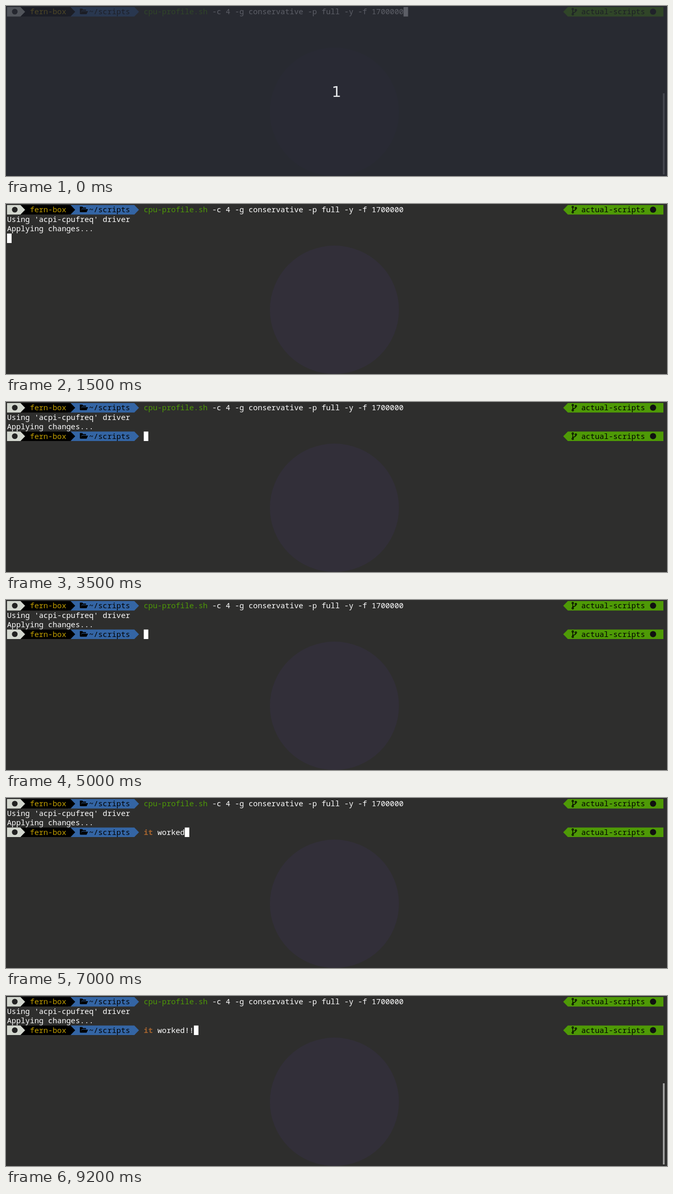
These frames come from a looping animation (1280x331 px, 9.3 s). An HTML page with a canvas:

```html
<!DOCTYPE html>
<html>
<head>
<meta charset="utf-8">
<style>
html, body { margin: 0; height: 100%; overflow: hidden; background: #2e2e2d; }
canvas { display: block; }
</style>
</head>
<body>
<canvas id="stage" width="1280" height="331"></canvas>
<script>
const ctx = document.getElementById('stage').getContext('2d');
const LOOP = 9300, CELL = 8.825, ROW = 18.5, LEFT = 2, TOP = 2;
const col = n => LEFT + n * CELL;
const rowTop = n => TOP + n * ROW;

// Cursor as [start, column, row]; row -1 hides it.
const cursorSteps = [
  [0, 87, 0], [900, 0, -1], [1000, 0, 1], [1500, 0, 3], [2000, 0, -1],
  [2200, 0, 3], [2800, 0, -1], [3500, 30, 3], [4000, 30, -1], [5000, 30, 3],
  [5200, 31, 3], [5300, 32, 3], [5500, 33, 3], [5700, 34, 3], [5900, 35, 3],
  [6200, 36, 3], [6400, 37, 3], [6500, 38, 3], [7000, 39, 3], [7900, 40, 3],
  [8000, 41, 3], [8600, 41, -1], [8800, 41, 3]
];
const typed = 'it worked!!';

function rect(x, y, w, h, color) {
  ctx.fillStyle = color;
  ctx.fillRect(x, y, w, h);
}

function dot(x, y, r, color) {
  ctx.fillStyle = color;
  ctx.beginPath();
  ctx.arc(x, y, r, 0, Math.PI * 2);
  ctx.fill();
}

function poly(color, ...points) {
  ctx.fillStyle = color;
  ctx.beginPath();
  points.forEach(([x, y]) => ctx.lineTo(x, y));
  ctx.fill();
}

function write(text, column, row, color, weight = 400) {
  ctx.font = weight + ' 14.7px "Noto Sans Mono", monospace';
  ctx.textAlign = 'left';
  ctx.textBaseline = 'alphabetic';
  ctx.fillStyle = color;
  [...text].forEach((ch, i) => ctx.fillText(ch, col(column + i), rowTop(row) + 14));
}

// Flat bar from x to the tip, pointing right or left.
function arrow(x, tip, y, color) {
  const neck = tip - Math.sign(tip - x) * 9;
  poly(color, [x, y], [neck, y], [tip, y + ROW / 2], [neck, y + ROW], [x, y + ROW]);
}

function folder(x, y) {
  poly('#000', [x, y + 10], [x, y], [x + 5, y], [x + 6, y + 2], [x + 12, y + 2],
    [x + 12, y + 4], [x + 4, y + 4], [x + 1, y + 9], [x + 4, y + 5],
    [x + 16, y + 5], [x + 13, y + 11], [x + 1, y + 11]);
}

function branch(x, y) {
  ctx.strokeStyle = '#000';
  ctx.lineWidth = 1.4;
  ctx.beginPath();
  for (const [cx, cy] of [[x, y], [x, y + 10], [x + 6, y + 2]]) {
    ctx.moveTo(cx + 1.5, cy);
    ctx.arc(cx, cy, 1.5, 0, Math.PI * 2);
  }
  ctx.moveTo(x, y + 1.5);
  ctx.lineTo(x, y + 8.5);
  ctx.moveTo(x + 6, y + 3.5);
  ctx.quadraticCurveTo(x + 6, y + 6, x, y + 7.5);
  ctx.stroke();
}

function prompt(row) {
  const y = rowTop(row);
  arrow(120, 257.5, y, '#3465a4');
  arrow(25, 134, y, '#000');
  arrow(2, 37, y, '#d3d7cf');
  dot(17, y + 9, 5.5, '#222');
  write('fern-box', 5, row, '#c4a000');
  folder(143, y + 3);
  write('~/scripts', 18, row, '#000');
  arrow(1273, 1079, y, '#4e9a06');
  branch(1097.5, y + 4);
  write('actual-scripts', 126, row, '#000');
  dot(1253, y + 9, 6, '#111');
}

function draw(t) {
  rect(0, 0, 1280, 331, '#2e2e2d');
  dot(636, 206, 125, '#322f39');

  prompt(0);
  write('cpu-profile.sh', 30, 0, '#4e9a06');
  write('-c 4 -g conservative -p full -y -f 1700000', 45, 0, '#fff');

  if (t >= 1500) {
    write("Using 'acpi-cpufreq' driver", 0, 1, '#fff');
    write('Applying changes...', 0, 2, '#fff');
  }

  const [, column, row] = cursorSteps.filter(step => step[0] <= t).pop();
  if (t >= 3500) {
    prompt(3);
    const text = typed.slice(0, column - 30);
    write(text.slice(0, 2), 30, 3, '#a5642f', 700);
    write(text.slice(3), 33, 3, '#fff');
    if (text.length === 4) rect(col(33), rowTop(3) + 15, CELL, 1, '#fff');
  }
  if (row >= 0) rect(col(column), rowTop(row), CELL, ROW, '#fff');

  const bar = t < 500 ? 1 : Math.min(1, Math.max(0, (Math.floor(t / 100) - 87) / 3));
  ctx.globalAlpha = bar;
  rect(1272, 170, 3.5, 158, '#a0a09f');
  ctx.globalAlpha = 1;

  if (t < 300) {
    rect(0, 0, 1280, 331, 'rgba(38, 41, 51, 0.75)');
    ctx.font = '29px "DejaVu Sans", sans-serif';
    ctx.textAlign = 'center';
    ctx.fillStyle = '#e3e5e8';
    ctx.fillText('1', 640, 176.5);
  }
}

function tick() {
  draw(performance.now() % LOOP);
  requestAnimationFrame(tick);
}
tick();
</script>
</body>
</html>
```
